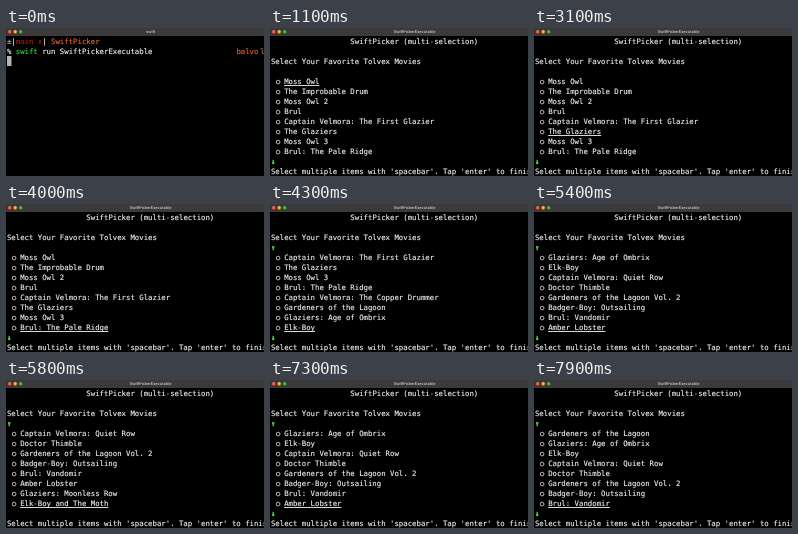
These frames come from a looping animation (258x148 px, 8 s). An HTML page:

```html
<!DOCTYPE html>
<html lang="en">
<head>
<meta charset="utf-8">
<title>SwiftPicker</title>
<style>
  html, body { margin: 0; width: 100%; height: 100%; overflow: hidden; background: #000; }
  svg { display: block; width: 258px; height: 148px; }
  text { font: 7.33px "DejaVu Sans Mono", monospace; text-rendering: geometricPrecision; white-space: pre; stroke-width: 0.14px; }
  .arrow { font-weight: 700; stroke-width: 0.3px; }
  #title { font: 600 3.85px Inter, sans-serif; text-anchor: middle; fill: #c4c2c2; }
</style>
</head>
<body>
<svg id="stage" viewBox="0 0 258 148">
  <rect width="258" height="148" fill="#000"/>
  <rect width="258" height="8" fill="#3b3939"/>
  <circle cx="3.7" cy="3.7" r="1.7" fill="#ff5f57"/>
  <circle cx="9.2" cy="3.7" r="1.7" fill="#febc2e"/>
  <circle cx="14.7" cy="3.7" r="1.7" fill="#28c840"/>
  <text id="title" x="144.6" y="5"></text>
  <g id="shell"></g>
  <g id="picker"></g>
</svg>
<script>
const LOOP = 8000, CELL = 4.413, LEFT = 0.9, VISIBLE = 8, FIRST_ROW = 4;
const WHITE = '#f0f0f0', GREEN = '#5fea5f', RED = '#a51d12', ORANGE = '#f0642c';

const movies = [
  'Moss Owl', 'The Improbable Drum', 'Moss Owl 2', 'Brul',
  'Captain Velmora: The First Glazier', 'The Glaziers', 'Moss Owl 3',
  'Brul: The Pale Ridge', 'Captain Velmora: The Copper Drummer',
  'Gardeners of the Lagoon', 'Glaziers: Age of Ombrix', 'Elk-Boy',
  'Captain Velmora: Quiet Row', 'Doctor Thimble',
  'Gardeners of the Lagoon Vol. 2', 'Badger-Boy: Outsailing',
  'Brul: Vandomir', 'Amber Lobster', 'Glaziers: Moonless Row',
  'Elk-Boy and The Moth'
];

// [time, value] steps; each value holds until the next one
const titles = [[0, 'swift'], [400, 'swift-package'], [1100, 'SwiftPickerExecutable']];
const cursorSteps = [
  [0, 0], [1500, 1], [2200, 2], [2600, 3], [2900, 4], [3100, 5], [3500, 6],
  [4000, 7], [4100, 8], [4200, 10], [4300, 11], [4400, 12], [4500, 13],
  [5000, 14], [5100, 15], [5300, 16], [5400, 17], [5600, 18], [5800, 19],
  [6500, 18], [7300, 17], [7400, 16], [7500, 15], [7900, 16]
];
const OPEN = 100, READY = 200, PICK_TIME = 6900, PICKED = 18;

const byId = id => document.getElementById(id);
const colX = col => LEFT + col * CELL;
const rowY = row => 16 + row * 10;
const show = (el, on) => el.setAttribute('visibility', on ? 'visible' : 'hidden');

function add(parent, tag, attrs, content = '') {
  const el = document.createElementNS('http://www.w3.org/2000/svg', tag);
  for (const key in attrs) el.setAttribute(key, attrs[key]);
  el.textContent = content;
  parent.append(el);
  return el;
}
const write = (parent, col, row, content, color = WHITE, style = '') =>
  add(parent, 'text', { x: colX(col), y: rowY(row), fill: color, stroke: color, class: style }, content);

const shell = byId('shell'), picker = byId('picker'), title = byId('title');

write(shell, 0, 0, '±', '#8fdc7c');
write(shell, 1, 0, '|');
write(shell, 2, 0, 'main ✗', RED);
write(shell, 8, 0, '|');
write(shell, 10, 0, 'SwiftPicker', ORANGE);
write(shell, 0, 1, '%');
write(shell, 2, 1, 'swift', '#3fcf3f');
write(shell, 8, 1, 'run SwiftPickerExecutable');
write(shell, 52, 1, 'balvo', ORANGE);
write(shell, 57.4, 1, 'l', '#a8823c');
add(shell, 'rect', { x: 1, y: 28, width: 4.5, height: 10, fill: '#b4b4b4' });

write(picker, 18, 0, 'SwiftPicker (multi-selection)');
write(picker, 0, 2, 'Select Your Favorite Tolvex Movies');
const up = write(picker, 0, 3, '↑', GREEN, 'arrow');
const down = write(picker, 0, 12, '↓', GREEN, 'arrow');
const footer = write(picker, 0, 13, "Select multiple items with 'spacebar'. Tap 'enter' to finish");

const rows = Array.from({ length: VISIBLE }, (_, i) => ({
  dot: add(picker, 'circle', { cx: 8.1, cy: rowY(FIRST_ROW + i) - 1.9, r: 1.85, 'stroke-width': 0.75 }),
  label: write(picker, 3, FIRST_ROW + i, '')
}));
const underline = add(picker, 'rect', { x: colX(3), height: 0.9, fill: WHITE });

const valueAt = (steps, t) => steps.reduce((value, step) => t >= step[0] ? step[1] : value, steps[0][1]);

function render(t) {
  title.textContent = valueAt(titles, t);
  shell.style.display = t < OPEN ? '' : 'none';
  picker.style.display = t < OPEN ? 'none' : '';

  const cursor = valueAt(cursorSteps, t);
  const top = Math.max(0, cursor - VISIBLE + 1);
  rows.forEach(({ dot, label }, i) => {
    const index = top + i;
    const picked = index === PICKED && t >= PICK_TIME;
    label.textContent = movies[index];
    dot.setAttribute('fill', picked ? GREEN : 'none');
    dot.setAttribute('stroke', picked ? GREEN : WHITE);
  });
  underline.setAttribute('y', rowY(FIRST_ROW + cursor - top) + 1.1);
  underline.setAttribute('width', movies[cursor].length * CELL);
  show(up, top > 0);
  show(down, t >= READY && top + VISIBLE < movies.length);
  show(footer, t >= READY);
}

const start = performance.now();
let last = -1;
function tick() {
  const t = (performance.now() - start) % LOOP;
  const step = Math.floor(t / 100);
  if (step !== last) render(step * 100);
  last = step;
  requestAnimationFrame(tick);
}
tick();
</script>
</body>
</html>
```
